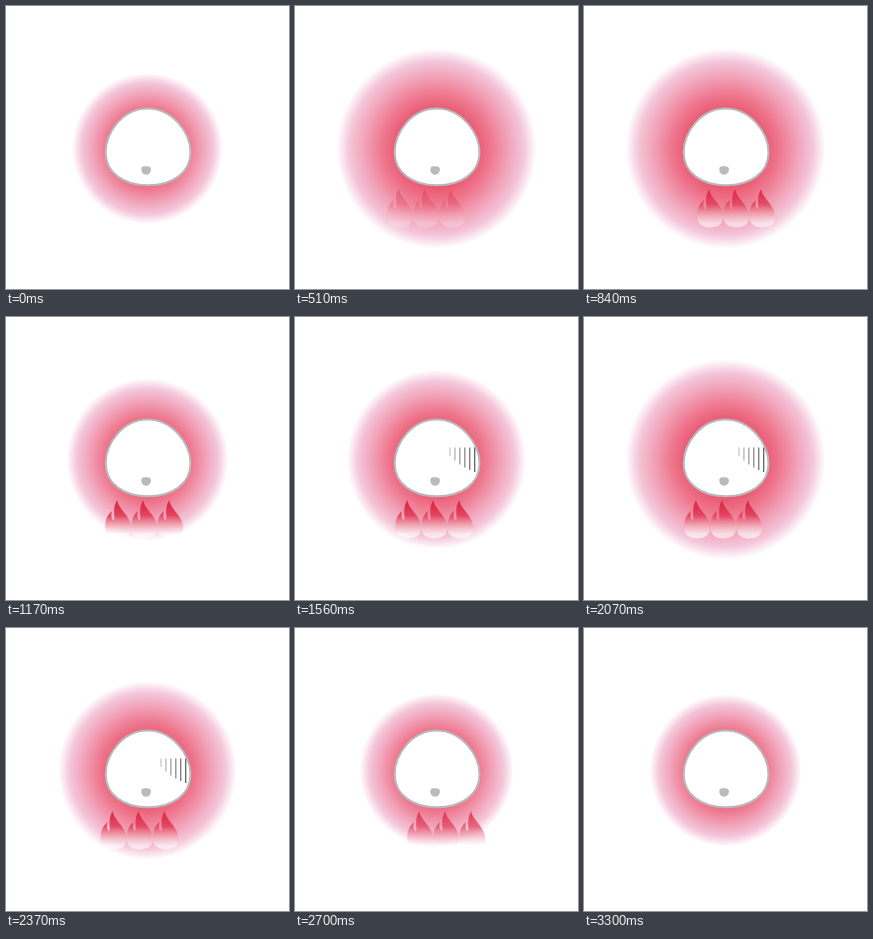
An HTML page that plays this animation: 283x283 px, repeating every 3.33 s.

```html
<!DOCTYPE html>
<html lang="en">
<head>
<meta charset="utf-8">
<title>Glowing pebble</title>
<style>
  html, body { margin: 0; width: 100%; height: 100%; overflow: hidden; background: #fff; }
  svg { display: block; width: 100%; height: 100%; }
</style>
</head>
<body>
<svg viewBox="0 0 283 283">
  <defs>
    <radialGradient id="glowFill">
      <stop offset="0" stop-color="#e7304d"/>
      <stop offset=".4" stop-color="#ea5b74"/>
      <stop offset=".54" stop-color="#ee778e"/>
      <stop offset=".72" stop-color="#f1a3b9"/>
      <stop offset=".87" stop-color="#f4c6d9"/>
      <stop offset="1" stop-color="#fff"/>
    </radialGradient>
    <linearGradient id="flameFill" x1="0" y1="0" x2="0" y2="1">
      <stop offset="0" stop-color="#d8203f"/>
      <stop offset=".4" stop-color="#e2455f"/>
      <stop offset=".9" stop-color="#fff" stop-opacity=".62"/>
      <stop offset="1" stop-color="#fff" stop-opacity=".62"/>
    </linearGradient>
    <path id="flame" fill="url(#flameFill)" d="M12 0C13 9 26 16 26 28C26 35 20 38.5 13 38.5C6 38.5 0 35 0 27C0 20 2 15 7 11C5 16 7 20 8.5 20C11 18 6 10 12 0Z"/>
  </defs>
  <circle id="glow" cx="141.5" cy="142.5" fill="url(#glowFill)"/>
  <g id="flames">
    <use href="#flame"/>
    <use href="#flame" x="26"/>
    <use href="#flame" x="52"/>
  </g>
  <path fill="#fff" stroke="#b9b9b9" stroke-width="2" d="M141.5 102.5C166 102.5 184.5 126 184.5 146.5C184.5 167 166 179.3 142 179.3C118 179.3 99.7 167 99.7 146.5C99.7 126 117 102.5 141.5 102.5Z"/>
  <path fill="#bababa" d="M135.3 163C135.5 160.2 138 160.2 140 160.3C143 160.2 145 160.8 145 163.5C144.8 167 142.5 168.8 140 168.8C137 168.6 135.2 166 135.3 163Z"/>
  <g id="stripes"></g>
</svg>
<script>
  const LOOP = 3330;
  const byId = id => document.getElementById(id);
  const glow = byId('glow'), flames = byId('flames'), stripes = byId('stripes');

  // Keys are [time, value] pairs.
  const radiusKeys = [[0, 75.5], [300, 75.5], [480, 100], [860, 100], [1290, 77],
    [1800, 100], [2070, 100], [2700, 77], [3330, 76]];
  const leftKeys = [[0, 98], [465, 89], [870, 115], [1365, 89], [1815, 115],
    [2265, 89], [2715, 113], [3165, 89], [3330, 98]];
  const fadeKeys = [[0, 0], [300, 0], [840, .88], [1170, 1], [2250, 1],
    [2700, .75], [3135, 0], [3330, 0]];

  const linear = u => u;
  const smooth = u => (1 - Math.cos(Math.PI * u)) / 2;

  function valueAt(keys, t, ease = linear) {
    const i = keys.findIndex(key => key[0] > t);
    const [t0, a] = keys[i - 1], [t1, b] = keys[i];
    return a + (b - a) * ease((t - t0) / (t1 - t0));
  }

  [139, 143.5, 147.5, 150.5, 153, 155].forEach((bottom, i) => {
    const line = document.createElementNS('http://www.w3.org/2000/svg', 'path');
    line.setAttribute('d', `M${155 + i * 4.95} 130.5V${bottom}`);
    line.setAttribute('stroke', '#333');
    line.setAttribute('stroke-opacity', .35 + i * .13);
    stripes.append(line);
  });

  function draw(t) {
    glow.setAttribute('r', valueAt(radiusKeys, t, smooth));
    flames.setAttribute('transform', `translate(${valueAt(leftKeys, t)} 183)`);
    flames.setAttribute('opacity', valueAt(fadeKeys, t));
    stripes.setAttribute('visibility', t >= 1380 && t < 2430 ? 'visible' : 'hidden');
  }

  const start = performance.now();
  function tick() {
    draw((performance.now() - start) % LOOP);
    requestAnimationFrame(tick);
  }
  tick();
</script>
</body>
</html>
```
